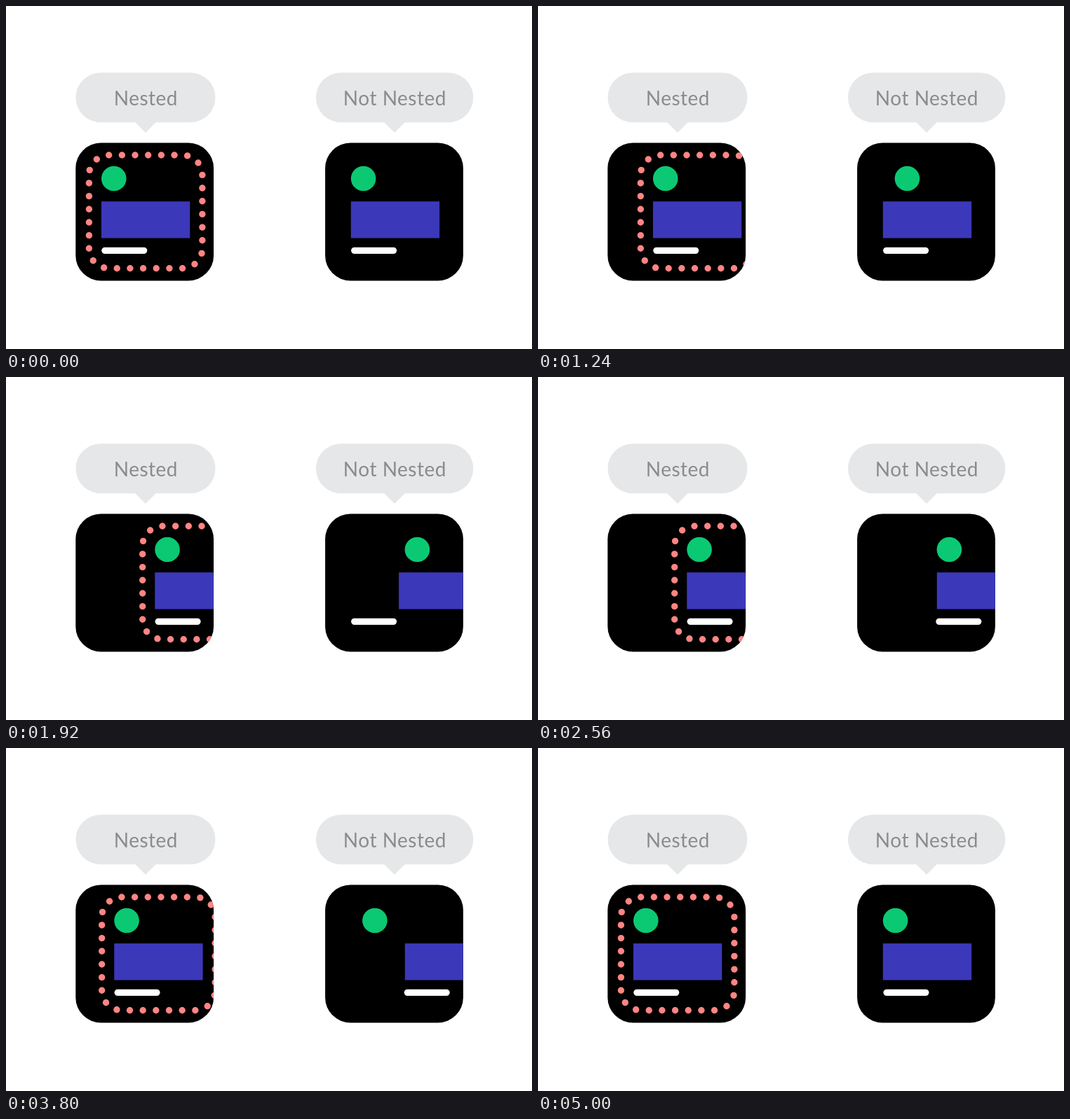
These frames come from a looping animation (750 by 490 pixels, 5.04 s). An HTML page:

```html
<!DOCTYPE html>
<html lang="en">
<head>
<meta charset="utf-8">
<title>Nested and not nested motion</title>
<style>
  html, body { margin: 0; width: 100%; height: 100%; overflow: hidden; background: #fff; }
  svg { display: block; width: 750px; height: 490px; }
  .bubble { fill: #e6e7e8; }
  .label { font: 28px Lato, "Open Sans", sans-serif; letter-spacing: .5px; text-anchor: middle; fill: #8a8b8d; }
  .ball { fill: #0bc973; }
  .block { fill: #3c38ba; }
  .bar { fill: #fff; }
  .dots { fill: none; stroke: #ff8584; stroke-width: 9.4; stroke-linecap: round; stroke-dasharray: 0 1; }
</style>
</head>
<body>
<svg viewBox="0 0 750 490">
  <defs>
    <rect id="card" x="99.3" y="195.6" width="196.8" height="196.8" rx="36"/>
    <path id="tail" d="M-15.5 165.5h31L0 181z"/>
    <clipPath id="inside"><use href="#card"/></clipPath>
    <circle id="ball" class="ball" cx="153.8" cy="246.5" r="17.8"/>
    <rect id="block" class="block" x="136" y="279.2" width="126.3" height="52.4"/>
    <rect id="bar" class="bar" x="136.3" y="344.7" width="65" height="9.3" rx="4.65"/>
  </defs>

  <g class="bubble">
    <rect x="99.5" y="95.2" width="199" height="71.1" rx="35.5"/>
    <use href="#tail" x="199"/>
    <rect x="442" y="95.2" width="224.3" height="71.1" rx="35.5"/>
    <use href="#tail" x="554"/>
  </g>
  <text class="label" x="199.4" y="142">Nested</text>
  <text class="label" x="554.4" y="142">Not Nested</text>

  <use href="#card"/>
  <g clip-path="url(#inside)">
    <g id="group">
      <rect class="dots" x="118.4" y="213" width="161.5" height="161.7" rx="28.3" pathLength="32"/>
      <use href="#ball"/><use href="#block"/><use href="#bar"/>
    </g>
  </g>

  <g transform="translate(355.8)">
    <use href="#card"/>
    <g clip-path="url(#inside)">
      <use id="soloBall" href="#ball"/>
      <use id="soloBlock" href="#block"/>
      <use id="soloBar" href="#bar"/>
    </g>
  </g>
</svg>
<script>
  const LOOP = 5040;
  const movers = [
    { id: "group",     out: 1000, back: 3440, duration: 560, distance: 76.3, influence: .49 },
    { id: "soloBall",  out: 1040, back: 3480, duration: 520, distance: 76.8, influence: .67 },
    { id: "soloBlock", out: 1560, back: 4000, duration: 520, distance: 77,   influence: .67 },
    { id: "soloBar",   out: 2080, back: 4520, duration: 520, distance: 75.6, influence: .67 }
  ].map(m => ({ ...m, node: document.getElementById(m.id) }));

  // Symmetric cubic-bezier(influence, 0, 1 - influence, 1)
  function ease(t, influence) {
    if (t <= 0) return 0;
    if (t >= 1) return 1;
    let low = 0, high = 1;
    for (let i = 0; i < 24; i++) {
      const s = (low + high) / 2, r = 1 - s;
      const x = 3 * influence * s * r * r + 3 * (1 - influence) * s * s * r + s ** 3;
      if (x < t) low = s; else high = s;
    }
    return low * low * (3 - 2 * low);
  }

  function render(time) {
    for (const { node, out, back, duration, distance, influence } of movers) {
      const progress = start => ease((time - start) / duration, influence);
      const x = distance * (progress(out) - progress(back));
      node.setAttribute("transform", `translate(${x.toFixed(3)})`);
    }
  }

  const began = performance.now();
  function tick() {
    render((performance.now() - began) % LOOP);
    requestAnimationFrame(tick);
  }
  tick();
</script>
</body>
</html>
```
